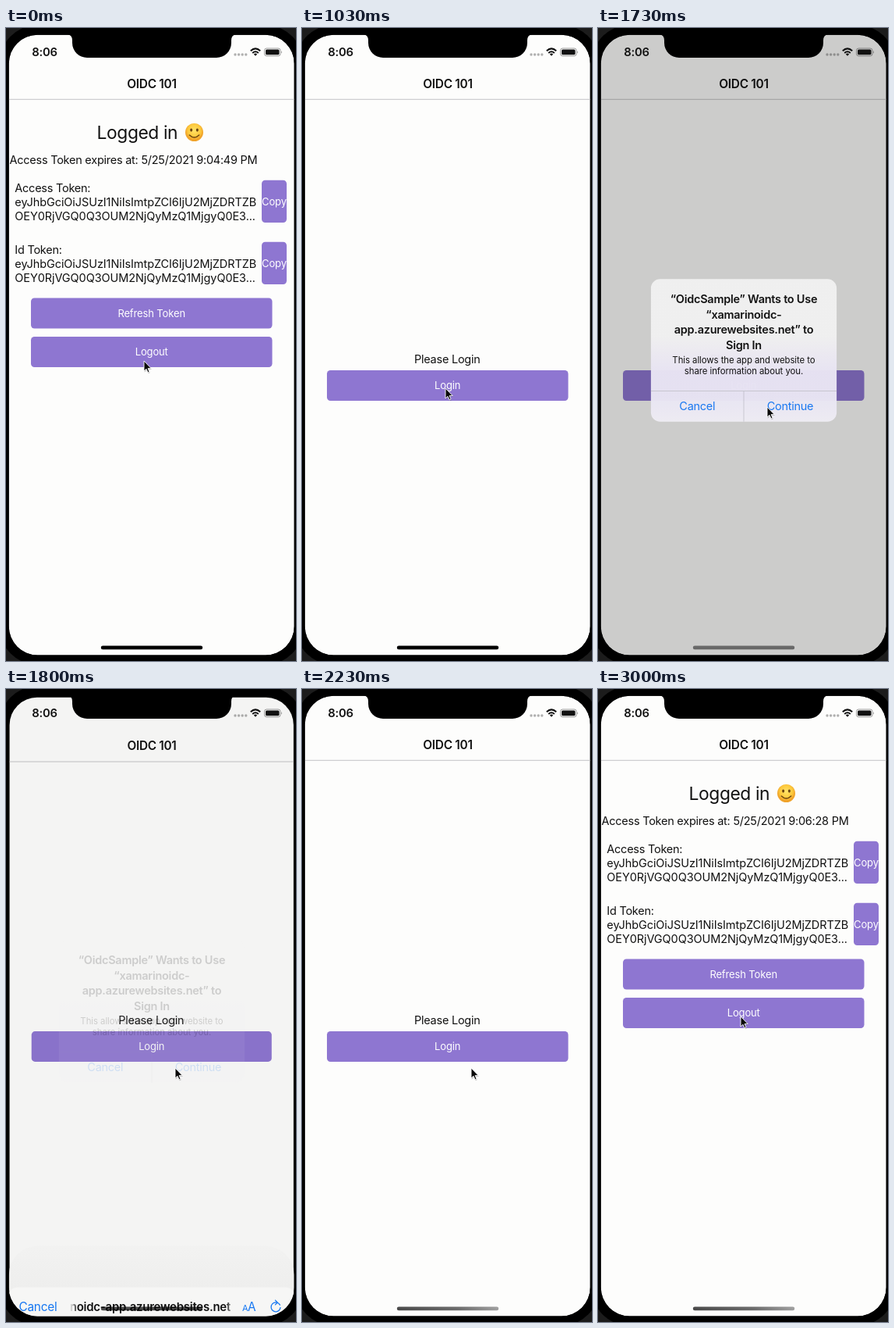
Write an HTML page that moves like this. It is 372 px wide and 810 px high and loops after 3130 ms.

```html
<!DOCTYPE html>
<html lang="en">
<head>
<meta charset="utf-8">
<title>OIDC sign-in</title>
<style>
  html, body { margin: 0; width: 100%; height: 100%; overflow: hidden; background: #000; }
  svg { display: block; width: 100vw; height: 100vh; }
  text { font: 14.5px Inter, "Open Sans", sans-serif; letter-spacing: -.017em; fill: #111; }
  .mid { text-anchor: middle; }
  .bold { font-size: 15.4px; font-weight: 600; }
  .hero { font-size: 22.8px; }
  .token { letter-spacing: -.006em; }
  .btn { font-size: 13px; letter-spacing: -.01em; fill: #fff; text-anchor: middle; }
  .note { font-size: 12.1px; letter-spacing: -.005em; }
  .link { font-size: 15.4px; fill: #1677f2; }
  .url { font-size: 15px; font-weight: 600; }
  .purple { fill: #8e76d1; }
  .icon { fill: none; stroke: #1677f2; stroke-width: 1.3; stroke-linecap: round; stroke-linejoin: round; }
  .grey { stroke: #b9b9b9; }
</style>
</head>
<body>
<svg viewBox="0 0 372 810" preserveAspectRatio="none">
  <defs>
    <clipPath id="screen"><rect x="3.7" y="8.7" width="366" height="793.8" rx="36.7"/></clipPath>
    <clipPath id="cardClip"><rect id="cardShape" x="3.7" y="8.7" width="366" height="793.8"/></clipPath>
    <linearGradient id="glass" x2="0" y2="1">
      <stop offset=".4" stop-color="#f1f1f1"/>
      <stop offset=".65" stop-color="#e9e4f4"/>
      <stop offset=".82" stop-color="#e9e5f4"/>
      <stop offset="1" stop-color="#efedf4"/>
    </linearGradient>
    <linearGradient id="lift" x2="0" y2="1">
      <stop offset="0" stop-color="#f2f2f1"/>
      <stop offset="1" stop-color="#e7e7e6"/>
    </linearGradient>
    <linearGradient id="bar">
      <stop offset="0" stop-color="#4a4a4a"/>
      <stop offset=".6" stop-color="#6c6c6c"/>
      <stop offset="1" stop-color="#a0a0a0"/>
    </linearGradient>
    <radialGradient id="sun" cy=".4">
      <stop offset="0" stop-color="#ffe368"/>
      <stop offset=".7" stop-color="#fdc93c"/>
      <stop offset="1" stop-color="#f0a32a"/>
    </radialGradient>
    <linearGradient id="fade">
      <stop offset="0" stop-color="#000"/>
      <stop offset=".05" stop-color="#fff"/>
      <stop offset=".97" stop-color="#fff"/>
      <stop offset="1" stop-color="#555"/>
    </linearGradient>
    <mask id="urlMask" maskUnits="userSpaceOnUse" x="82" y="66" width="207" height="40">
      <rect x="82" y="66" width="207" height="40" fill="url(#fade)"/>
    </mask>
  </defs>

  <rect width="372" height="810" fill="#1c1c1c"/>
  <rect x="-10" y="-5" width="393" height="821" rx="54"/>
  <g clip-path="url(#screen)">
    <g id="card" clip-path="url(#cardClip)">
      <rect x="3" y="8" width="368" height="796" fill="#fdfdfc"/>
      <path d="M3 91.3H371" stroke="#c4c4c6"/>
      <text class="bold mid" x="187" y="76.6">OIDC 101</text>

      <g id="home">
        <text class="hero" x="116.5" y="142">Logged in</text>
        <circle cx="241.5" cy="133.5" r="11.5" fill="url(#sun)"/>
        <g fill="#6b4410">
          <ellipse cx="237.6" cy="130.6" rx="1.5" ry="2.1"/>
          <ellipse cx="245.4" cy="130.6" rx="1.5" ry="2.1"/>
        </g>
        <path d="M235.3 137Q241.5 143 247.7 137" fill="none" stroke="#6b4410" stroke-width="1.4" stroke-linecap="round"/>
        <text id="expiry" x="4.5" y="173.8"></text>
        <g id="tokens"></g>
        <rect class="purple" x="32" y="345.5" width="309.5" height="39" rx="4.5"/>
        <text class="btn" x="186.7" y="370.2">Refresh Token</text>
        <rect class="purple" x="32" y="395" width="309.5" height="39" rx="4.5"/>
        <text id="logout" class="btn" x="186.7" y="419.4">Logout</text>
      </g>

      <g id="welcome">
        <text class="mid" x="186.3" y="428.7">Please Login</text>
        <rect class="purple" x="32" y="438" width="309.5" height="39" rx="4.5"/>
        <text id="login" class="btn" x="186.7" y="462.4">Login</text>
      </g>
    </g>

    <rect id="dim" width="372" height="810"/>

    <g id="alert">
      <rect id="pane" x="60.3" y="315.5" width="253.4" height="194" rx="12.5" fill="url(#glass)"/>
      <g id="alertTitle"></g>
      <text class="note mid" x="187" y="430">This allows the app and website to</text>
      <text class="note mid" x="187" y="445">share information about you.</text>
      <path d="M60.3 467.8H313.7M187 467.8V509.5" stroke="#bdbdc4" stroke-width=".8"/>
      <text class="link mid" x="123.5" y="494">Cancel</text>
      <text class="link mid" x="250.3" y="494">Continue</text>
    </g>

    <g id="sheet">
      <rect id="backing" x="3.7" y="8" width="366" height="130" rx="37" fill="url(#lift)"/>
      <path d="M3.7 830V71a10 10 0 0 1 10 -10H359.7a10 10 0 0 1 10 10V830Z" fill="#f6f6f5"/>
      <rect x="3.7" y="110" width="366" height="618" fill="#fdfdfc"/>
      <path d="M3.7 110H369.7M3.7 728.3H369.7" stroke="#d3d3d3" stroke-width=".9"/>
      <text class="link" x="16.5" y="91">Cancel</text>
      <g mask="url(#urlMask)">
        <text id="host" class="url" x="288" y="91" text-anchor="end">xamarinoidc-app.azurewebsites.net</text>
        <text id="callback" class="url" x="82" y="91">101:/authenticated?code=8A6</text>
      </g>
      <g id="sizer">
        <text class="link" x="303" y="91" style="font-size:11px">A</text>
        <text class="link" x="310" y="91">A</text>
      </g>
      <g id="reload">
        <path class="icon" d="M5.4 -2.6A6 6 0 1 0 6 1M-.6 -8.6L2.4 -5.6L-.6 -2.8"/>
      </g>
      <rect id="progress" x="3.7" y="107.6" height="2.3" fill="#1677f2"/>
      <path class="icon grey" d="M33 745L25.5 752.5L33 760M105.5 745L113 752.5L105.5 760"/>
      <path class="icon" d="M338.5 748H334V762.5H349.5V748H345M341.8 756V741.5M338 745L341.8 741.2L345.6 745"/>
    </g>
  </g>

  <path d="M79 8Q85 9 85 16V19A19 19 0 0 0 104 38H270A19 19 0 0 0 289 19V16Q289 9 295 8Z"/>

  <g id="status">
    <text class="bold" x="33.3" y="36.4" style="font-size:14.8px;fill:inherit">8:06</text>
    <g opacity=".32">
      <circle cx="294" cy="34" r="1.7"/><circle cx="298.6" cy="34" r="1.7"/>
      <circle cx="303.2" cy="34" r="1.7"/><circle cx="307.8" cy="34" r="1.7"/>
    </g>
    <g fill="none" stroke="currentColor" stroke-width="2">
      <path d="M313.8 29.2Q320 23.6 326.2 29.2M316.2 32Q320 28.6 323.8 32"/>
    </g>
    <path d="M317.8 33.4Q320 31.6 322.2 33.4L320 35.8Z"/>
    <rect x="331.5" y="26" width="20.5" height="9.8" rx="2.8" fill="none" stroke="currentColor" stroke-opacity=".4"/>
    <rect x="333" y="27.5" width="17.5" height="6.8" rx="1.5"/>
    <path d="M353.2 29.2Q355 30.9 353.2 32.6Z" opacity=".5"/>
  </g>
  <rect id="homeBar" x="121.8" y="790.5" width="130.4" height="4.7" rx="2.3"/>

  <g id="cursor">
    <path d="M.6 1.4V14.6L3.7 11.8L5.7 16.2L7.7 15.3L5.8 11H10Z" fill="#000" opacity=".22"/>
    <path d="M0 0V13L3 10.3L5 14.9L7 14L5.1 9.6H9.2Z" fill="#0a0a0a" stroke="#fff" stroke-width=".9" stroke-linejoin="round"/>
  </g>
</svg>

<script>
const LOOP = 3130;
const $ = id => document.getElementById(id);
const set = (id, attr, value) => $(id).setAttribute(attr, value);
const show = (id, on) => set(id, 'display', on ? 'inline' : 'none');
const mix = (a, b, p) => a + (b - a) * p;
const span = (t, from, to) => Math.min(1, Math.max(0, (t - from) / (to - from)));
const easeInOut = p => p < .5 ? 2 * p * p : 1 - 2 * (1 - p) ** 2;
const easeOut = (p, n) => 1 - (1 - p) ** n;

const tokenRow = (label, y) => `
  <text x="11.3" y="${y}">${label}:</text>
  <text class="token" x="11.3" y="${y + 18}">eyJhbGciOiJSUzI1NiIsImtpZCI6IjU2MjZDRTZB</text>
  <text class="token" x="11.3" y="${y + 35.8}">OEY0RjVGQ0Q3OUM2NjQyMzQ1MjgyQ0E3...</text>
  <rect class="purple" x="328" y="${y - 15.2}" width="32" height="54.3" rx="4.5"/>
  <text class="btn" x="344" y="${y + 17}">Copy</text>`;
$('tokens').innerHTML = tokenRow('Access Token', 210) + tokenRow('Id Token', 289);

$('alertTitle').innerHTML = ['“OidcSample” Wants to Use', '“xamarinoidc-', 'app.azurewebsites.net” to', 'Sign In']
  .map((line, i) => `<text class="bold mid" x="187" y="${348.5 + i * 20.8}">${line}</text>`).join('');

// Pointer moves: start, end, target x, target y, sideways bow
const moves = [
  [310, 470, 181, 420, 0],
  [840, 1030, 184, 461, 0],
  [1500, 1700, 217, 485, 0],
  [2510, 3000, 183, 419, -4]
];

function pointer(t) {
  let x = 177, y = 426;
  for (const [from, to, tx, ty, bow] of moves) {
    const p = easeInOut(span(t, from, to));
    x = mix(x, tx, p) + bow * Math.sin(Math.PI * p);
    y = mix(y, ty, p);
  }
  return [x, y];
}

// Label dims under a press, then recovers
const pressed = (t, at, length) => 1 - .7 * Math.sin(Math.PI * span(t, at, at + length));

function render(t) {
  const loggedOut = t >= 500 && t < 2360;
  show('home', !loggedOut);
  show('welcome', loggedOut);
  $('expiry').textContent = `Access Token expires at: 5/25/2021 ${t < 2360 ? '9:04:49' : '9:06:28'} PM`;
  set('logout', 'opacity', pressed(t, 420, 110));
  set('login', 'opacity', pressed(t, 1200, 150));

  const enter = easeOut(span(t, 1350, 1530), 3);
  const leave = easeOut(span(t, 1730, 1850), 2);
  const rise = easeInOut(span(t, 1765, 1995)) - easeInOut(span(t, 2050, 2225));

  // The alert shrinks into place, then fades out at its resting size
  const zoom = mix(1.1, .94, enter);
  show('alert', enter > 0 && leave < 1);
  set('alert', 'opacity', Math.min(1, enter * 1.2) * (1 - leave));
  set('alert', 'transform', `translate(187 412.5) scale(${zoom}) translate(-187 -412.5)`);
  set('pane', 'opacity', 1 - .7 * leave);
  set('dim', 'opacity', Math.max(.2 * enter * (1 - leave), .19 * rise));

  set('card', 'transform', `translate(186.5 ${9 + 43 * rise}) scale(${1 - .096 * rise}) translate(-186.5 -9)`);
  set('cardShape', 'rx', mix(36.7, 10, rise));

  const back = t >= 2000;
  show('sheet', rise > 0);
  set('sheet', 'transform', `translate(0 ${741 * (1 - rise)})`);
  set('backing', 'opacity', back ? 0 : (1 - rise) ** 2);
  show('host', !back);
  show('callback', back);
  show('sizer', !back);
  set('reload', 'transform', `translate(346 86) scale(${back ? .45 : 1})`);
  set('reload', 'opacity', back ? .7 : 1);
  set('progress', 'width', 13 * span(t, 1960, 2030));

  const ink = rise > .5 ? '#fff' : '#111';
  set('status', 'fill', ink);
  set('status', 'color', ink);
  set('homeBar', 'fill', back ? 'url(#bar)' : '#000');
  set('homeBar', 'opacity', back ? 1 : mix(1, .48, span(t, 1330, 1400) - .5 * leave));

  set('cursor', 'transform', `translate(${pointer(t)})`);
}

const start = performance.now();
function tick() {
  render((performance.now() - start) % LOOP);
  requestAnimationFrame(tick);
}
tick();
</script>
</body>
</html>
```
